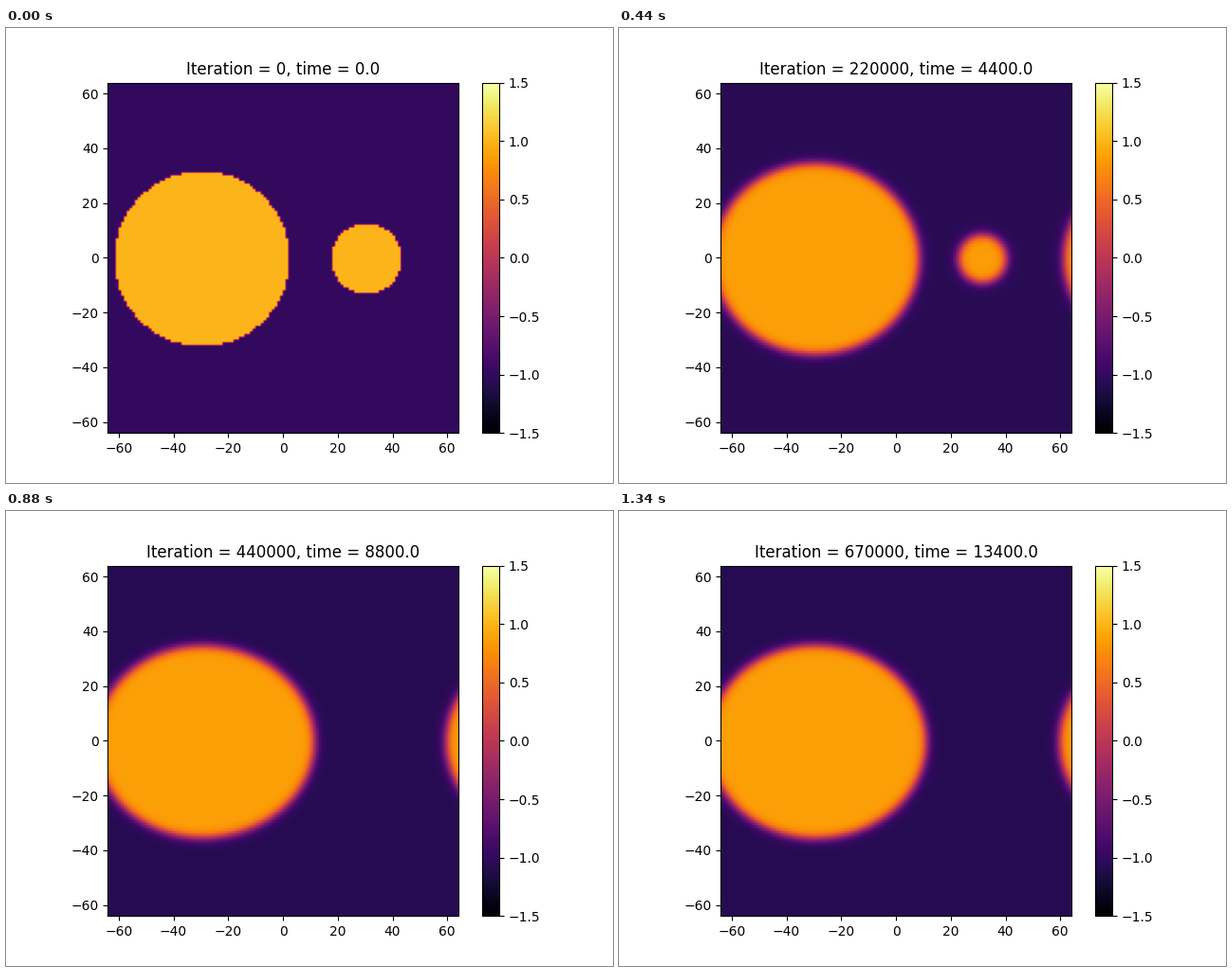
Recreate the animation shown at these times as a matplotlib script. Size 640 px wide and 480 px high, loop 1.36 s.

```python
import numpy as np
import matplotlib.pyplot as plt
from matplotlib.animation import FuncAnimation

FRAMES = 68
HALF = 64            # half width of the periodic box
WIDTH = 2.0          # interface thickness
BIG = (-29.5, -0.5)
SMALL = (30.5, -0.5)

cells = np.arange(-HALF, HALF) + 0.5
X, Y = np.meshgrid(cells, cells)


def offset(center):
    """Shortest periodic displacement from a drop's center."""
    dx = (X - center[0] + HALF) % (2 * HALF) - HALF
    return dx, Y - center[1]


def step(dist):
    """Smooth indicator: 1 inside, 0 outside."""
    return 0.5 * (1 - np.tanh(dist / WIDTH))


def initial_field():
    inside = np.hypot(*offset(BIG)) < 32
    inside |= np.hypot(*offset(SMALL)) < 13
    return np.where(inside, 1.0, -1.0)


def big_drop(t, r):
    """Drop that swells sideways as it takes up the small one's mass."""
    relax = np.exp(-t / 200)
    ry = 34.7 + 4.5e-5 * t - 2.7 * relax
    area = 1355 - 162 * relax + 50 * min(t / 6050, 1)
    rx = (area - r**2) / ry
    lean = np.interp(t, [0, 3000, 6000, 7200, 13400],
                     [-0.1, 0, 0.9, 1.1, 0.9])
    dx, dy = offset(BIG)
    rx = np.where(dx > 0, rx + lean, rx - lean)
    f = np.hypot(dx / rx, dy / ry)
    slope = np.hypot(dx / rx**2, dy / ry**2)
    scale = np.maximum(f, 1e-6) / np.maximum(slope, 1e-6 / ry)
    return step((f - 1) * scale)


def small_drop(t, r):
    """Drop that evaporates and drifts away from its neighbour."""
    center = (SMALL[0] + 2.4e-4 * t, SMALL[1])
    fade = 1 - np.exp(-(r / 4) ** 2)
    return fade * step(np.hypot(*offset(center)) - r)


def field(t):
    if t == 0:
        return initial_field()
    r = np.cbrt(max(2480 - 0.41 * t, 0))
    high = 0.87 + 0.13 * np.exp(-t / 100)
    low = np.interp(t, [0, 3000, 7000], [-1.05, -1.058, -1.077])
    low += 0.05 * np.exp(-t / 300)
    return low + (high - low) * (big_drop(t, r) + small_drop(t, r))


fig, ax = plt.subplots(figsize=(6.4, 4.8), dpi=100)
image = ax.imshow(field(0), cmap="inferno", vmin=-1.5, vmax=1.5,
                  origin="lower", extent=(-HALF, HALF, -HALF, HALF))
fig.colorbar(image)
title = ax.set_title("")


def update(k):
    t = 200 * k
    image.set_data(field(t))
    title.set_text(f"Iteration = {10000 * k}, time = {t:.1f}")
    return image, title


anim = FuncAnimation(fig, update, frames=FRAMES, interval=20,
                     repeat=True, repeat_delay=0)
plt.show()
```
